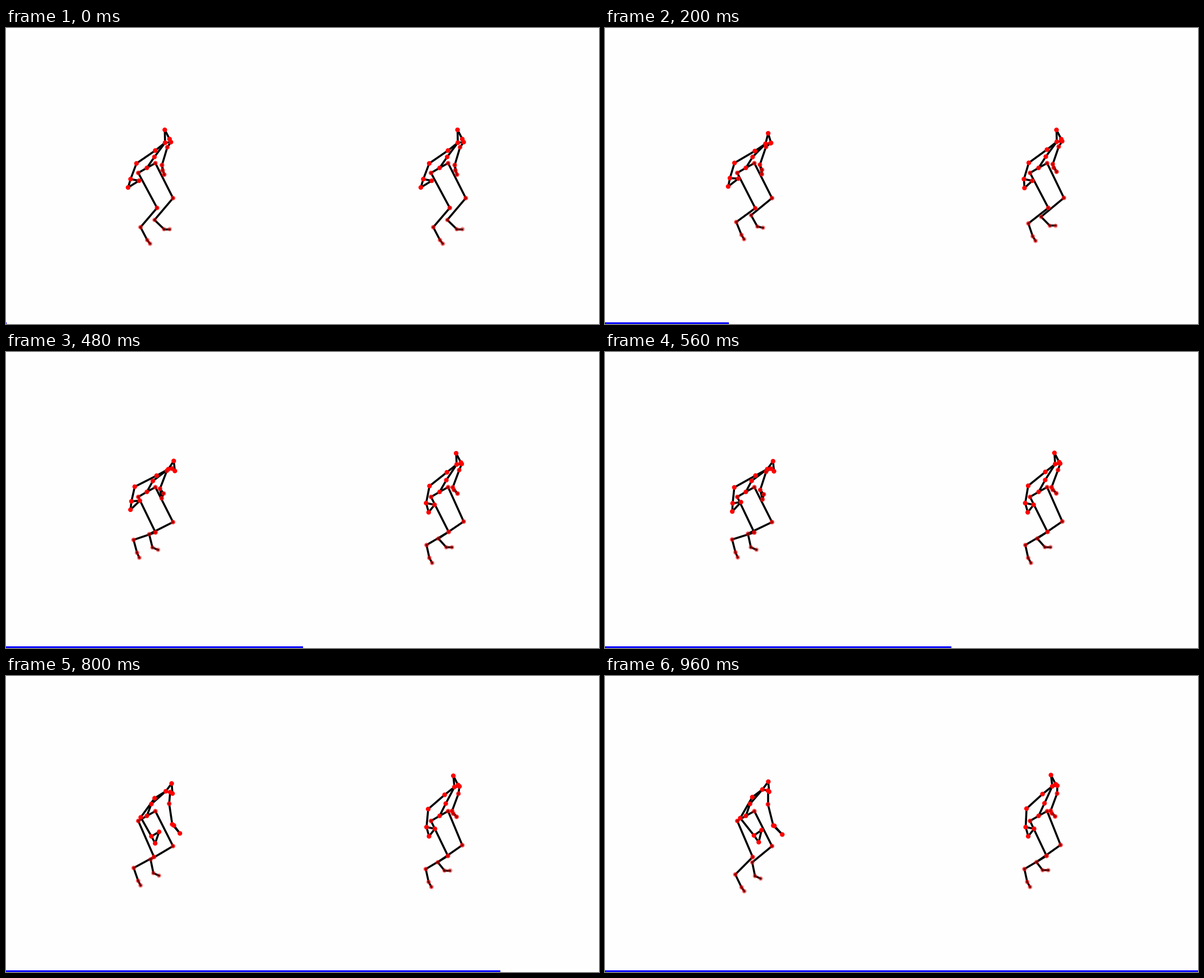
These frames come from a looping animation (1058 px wide and 529 px high, 1 s). A matplotlib script:

```python
import numpy as np
import matplotlib.pyplot as plt
from matplotlib.animation import FuncAnimation
from matplotlib.collections import LineCollection
from matplotlib.patches import Rectangle

W, H, DPI = 1058, 529, 92
FRAMES, STEP = 25, 40
PX = 72 / DPI            # points per pixel
ROOTS = [np.array([251.3, 250]), np.array([773.6, 250])]


def ease_out(t, end):
    return np.sin(np.pi / 2 * min(t / end, 1))


def smooth(t, start, end):
    u = np.clip((t - start) / (end - start), 0, 1)
    return u * u * (3 - 2 * u)


def left_curves(t):
    """Crouch and recover, settle forward, then swing both arms."""
    swing = smooth(t, 12, 23)
    return dict(fold=np.sin(np.pi * (t / FRAMES) ** 1.2), settle=ease_out(t, 16),
                swing=swing, lift=np.sin(np.pi * swing))


def right_curves(t):
    """A quick first bend, then a slow drift."""
    return dict(rise=ease_out(t, 12), drift=t / (FRAMES - 1))


skeleton = {}


def joint(name, parent, alpha, offset, **moves):
    """Bone from parent to joint; each move shifts it along one curve."""
    skeleton[name] = parent, alpha, np.array(offset), moves


joint("pelvis", None, .88, (0, 0))
joint("hip_l", "pelvis", .68, (-15.3, 9))
joint("knee_l", "hip_l", .74, (33.5, 62.5), settle=(-3, 1), swing=(-3, 1), drift=(-4, 0))
joint("ankle_l", "knee_l", .52, (-29.5, 34.5), fold=(-10, -22), rise=(-10, -11))
joint("foot_l", "ankle_l", .43, (12, 23), fold=(-6, 0), rise=(-7, 0))
joint("toe_l", "foot_l", .41, (5, 6.5), fold=(-1, 2.5), rise=(0, 2.5))
joint("hip_r", "pelvis", .62, (15.2, -8.5))
joint("knee_r", "hip_r", .62, (31.5, 62.5), drift=(-7.5, -2))
joint("ankle_r", "knee_r", .42, (-33, 39),
      fold=(-9, -10), settle=(-1, -8.5), rise=(-14, -8.5), drift=(4, 0))
joint("foot_r", "ankle_r", .37, (17, 16.5), settle=(-12, 8), drift=(-6, -2))
joint("toe_r", "foot_r", .35, (10, 0), settle=(0, 4.5))

joint("spine", "pelvis", .92, (13.5, -19.5), settle=(-3, 0), swing=(-3, -2), drift=(-3, -3))
joint("neck", "spine", 1, (19, -25.5),
      fold=(7, 5.5), settle=(2, -1), rise=(4, 0), drift=(-9, -5))
joint("head", "neck", 1, (-.5, -23), settle=(11, 9), rise=(1, 3), drift=(-3, 0))
joint("face", "head", 1, (8.5, 16.5), settle=(-7, 1.5))

joint("shoulder_l", "neck", 1, (-17.5, 14), fold=(-3.5, -2.5))
joint("elbow_l", "shoulder_l", 1, (-33.5, 23),
      settle=(-6, -3.5), swing=(18, 18), drift=(5, 3))
joint("wrist_l", "elbow_l", 1, (-10.5, 28),
      settle=(5, -2), swing=(30, 5), lift=(0, 7), drift=(9, 5))
joint("thumb_l", "wrist_l", .9, (15, 3), settle=(0, -4.5), swing=(-1.5, -8))
joint("hand_l", "wrist_l", 1, (-4.5, 15), settle=(3, 0), swing=(10, -3), rise=(9, 1.5))

joint("shoulder_r", "neck", .95, (10.5, -1), fold=(-4, 0), swing=(0, 3), rise=(-1.5, 0))
joint("elbow_r", "shoulder_r", .76, (-6.5, 9),
      settle=(-3, -5.5), swing=(9.5, 21), rise=(-2, -1), drift=(8, 6))
joint("wrist_r", "elbow_r", .76, (-9.5, 32), settle=(-3, 0), swing=(22, 6), rise=(-2, -1))
joint("thumb_r", "wrist_r", .64, (1, 9.5), settle=(6, -1), swing=(-5, -8), rise=(1, -5))
joint("hand_r", "wrist_r", .68, (4, 17), settle=(-1, 0), swing=(13, -1),
      rise=(5, -5), drift=(-1, -2))

BONES = [(parent, name) for name, (parent, *_) in skeleton.items()
         if parent and name != "hip"]
BONES += [("thumb_l", "hand_l"), ("thumb_r", "hand_r")]
FOREARM = ("wrist_r", "thumb_r", "hand_r")


def solve(root, curves):
    """Joint positions, walking outwards from the pelvis."""
    pose = {}
    for name, (parent, _, offset, moves) in skeleton.items():
        start = pose[parent] if parent else root
        pose[name] = start + offset + sum(
            curves.get(key, 0) * np.array(vec) for key, vec in moves.items())
    return pose


fig = plt.figure(figsize=(W / DPI, H / DPI), dpi=DPI, facecolor="#fefefe")
ax = fig.add_axes([0, 0, 1, 1])
ax.set(xlim=(0, W), ylim=(H, 0))
ax.axis("off")


def make_figure():
    bones = LineCollection([], colors="black", linewidths=3.6 * PX,
                           capstyle="projecting", zorder=2)
    ax.add_collection(bones)
    dots = ax.scatter(*np.zeros((2, len(skeleton))), s=(6.2 * PX) ** 2,
                      linewidths=2.1 * PX, zorder=3)
    return bones, dots


figures = [make_figure(), make_figure()]
bar = ax.add_patch(Rectangle((0, H - 2.8), 0, 2.8, color="blue", lw=0, zorder=4))


def draw(i):
    for root, curves, (bones, dots) in zip(
            ROOTS, (left_curves(i), right_curves(i)), figures):
        pose = solve(root, curves)
        bones.set_segments([(pose[a], pose[b]) for a, b in BONES])
        # a hand swinging forward comes nearer and loses its haze
        near = .35 * curves.get("swing", 0)
        rgba = [(1, 0, 0, min(1, alpha + near * (name in FOREARM)))
                for name, (_, alpha, *_) in skeleton.items()]
        dots.set_offsets(list(pose.values()))
        dots.set_facecolor(rgba)
        dots.set_edgecolor(rgba)
    bar.set_width(W * i / (FRAMES - 1) + .8)
    return [bar]


anim = FuncAnimation(fig, draw, frames=FRAMES, interval=STEP, repeat=True,
                     repeat_delay=0, blit=False)
plt.show()
```
